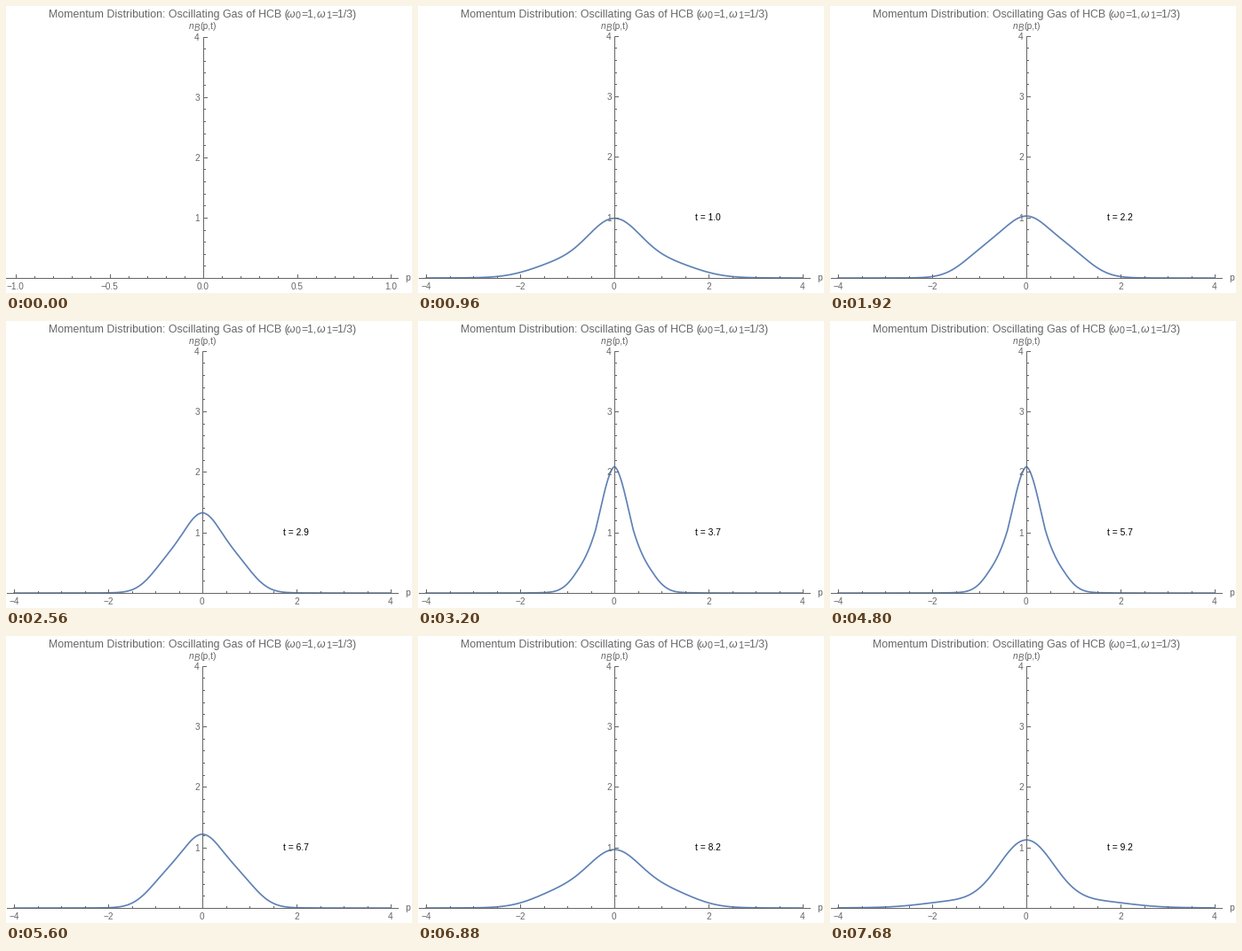
Recreate the animation shown at these times as a matplotlib script. Size 457x324 px, loop 7.84 s.

```python
import numpy as np
import matplotlib.pyplot as plt
from matplotlib.animation import FuncAnimation

W, H, DPI = 457, 324, 64
PX = 72 / DPI  # points per pixel
GREY, BLUE = "#666666", "#5e81b5"
BASE = 307.5   # pixel height of the p axis
W1 = 1 / 3     # trap frequency after the quench (1 before)
STEP = np.pi / 16
FRAMES = 49

plt.rcParams["font.family"] = "Liberation Sans"
fig = plt.figure(figsize=(W / DPI, H / DPI), dpi=DPI, facecolor="white")
ax = fig.add_axes([0, 0, 1, 1])
ax.set(xlim=(0, W), ylim=(H, 0))
ax.axis("off")


def text(x, y, s, size, color=GREY, ha="left", style="normal"):
    return ax.text(x, y, s, fontsize=size * PX, color=color, ha=ha,
                   va="baseline", style=style, zorder=4)


def make_axes(x0, ux, uy, left, labels, minor):
    """Axes crossing at x0 with ux, uy pixels per unit."""
    segs = [((left, BASE), (442, BASE)), ((x0, BASE + 0.5), (x0, BASE - 4 * uy))]
    arts = []
    n = round(abs(float(labels[0])) / minor)
    major = {round(float(s) / minor): s for s in labels}
    for i in range(-n, n + 1):
        x = np.floor(x0 + i * minor * ux) + 0.5
        segs.append(((x, BASE), (x, BASE - (4.5 if i in major else 2.5))))
        if i in major:
            s = major[i].replace("-", "\u2212")
            arts.append(text(x - 0.6, 320, s, 10, ha="center"))
    for i in range(1, 21):
        y = np.floor(BASE - i * uy / 5) + 0.5
        segs.append(((x0, y), (x0 + (4.5 if i % 5 == 0 else 2.5), y)))
        if i % 5 == 0:
            arts.append(text(217.8, y + 3.5, str(i // 5), 10, ha="right"))
    for (xa, ya), (xb, yb) in segs:
        arts += ax.plot([xa, xb], [ya, yb], color=GREY, lw=PX, zorder=3,
                        solid_capstyle="butt", snap=False)
    return arts


# Two hard-core bosons: ground state psi(x, z) of the initial trap
x = np.linspace(-6.5, 6.5, 261)
dx = x[1] - x[0]
psi = np.abs(x[:, None] - x) * np.exp(-(x[:, None]**2 + x**2) / 2) / np.sqrt(np.pi)
knots = np.linspace(-4, 4, 41)
fine = np.linspace(-4, 4, 801)


def momentum(t):
    """Momentum distribution at the knots from the scaling solution."""
    b = np.sqrt(1 + (1 / W1**2 - 1) * np.sin(W1 * t)**2)
    chirp = (1 / W1**2 - 1) * W1 * np.sin(2 * W1 * t) / 2
    wave = np.exp(1j * (chirp * x**2 / 2 - b * knots[:, None] * x))
    return b / np.pi * np.sum(np.abs(wave @ psi * dx)**2, axis=1) * dx


def cubic(values):
    """Local cubic interpolation through the four nearest knots."""
    u = (fine - knots[0]) / (knots[1] - knots[0])
    start = np.clip(np.floor(u + 1e-9).astype(int) - 1, 0, len(knots) - 4)
    s = u - start
    out = np.zeros_like(fine)
    for j in range(4):
        w = np.ones_like(fine)
        for m in range(4):
            if m != j:
                w *= (s - m) / (j - m)
        out += w * values[start + j]
    return out


text(47.7, 13, "Momentum Distribution: Oscillating Gas of HCB (", 12.33)
text(315.8, 13, "\u03c9", 12.3, style="italic")
text(325.8, 14.5, "0", 10.8)
text(332.5, 13, "=1,", 12.3)
text(350, 13, "\u03c9", 12.3, style="italic")
text(359.7, 14.5, "1", 10.8)
text(366.2, 13, "=1/3)", 12.3)
text(206, 26, "n", 10.3, style="italic")
text(212, 28, "B", 9.5, style="italic")
text(218.5, 26, "(p,t)", 10.3)
text(452.5, 310.5, "p", 10.3, ha="center")

empty = make_axes(222.5, 211, 68.1, 0, ["-1.0", "-0.5", "0.0", "0.5", "1.0"], 0.1)
full = make_axes(221.5, 53, 68.3, 1, ["-4", "-2", "0", "2", "4"], 0.5)
curve, = ax.plot([], [], color=BLUE, lw=1.7 * PX, zorder=2, snap=False)
clock = text(326.5, 242.5, "", 10.3, color="black", ha="center")
full += [curve, clock]


def update(k):
    for a in empty:
        a.set_visible(k == 0)
    for a in full:
        a.set_visible(k > 0)
    if k:
        t = (k - 1) * STEP
        curve.set_data(221.1 + 53 * fine, BASE - 0.4 - 68.3 * cubic(momentum(t)))
        clock.set_text(f"t = {t:.1f}")
    return empty + full


anim = FuncAnimation(fig, update, frames=FRAMES, interval=160, repeat=True,
                     repeat_delay=0, blit=False)
plt.show()
```
